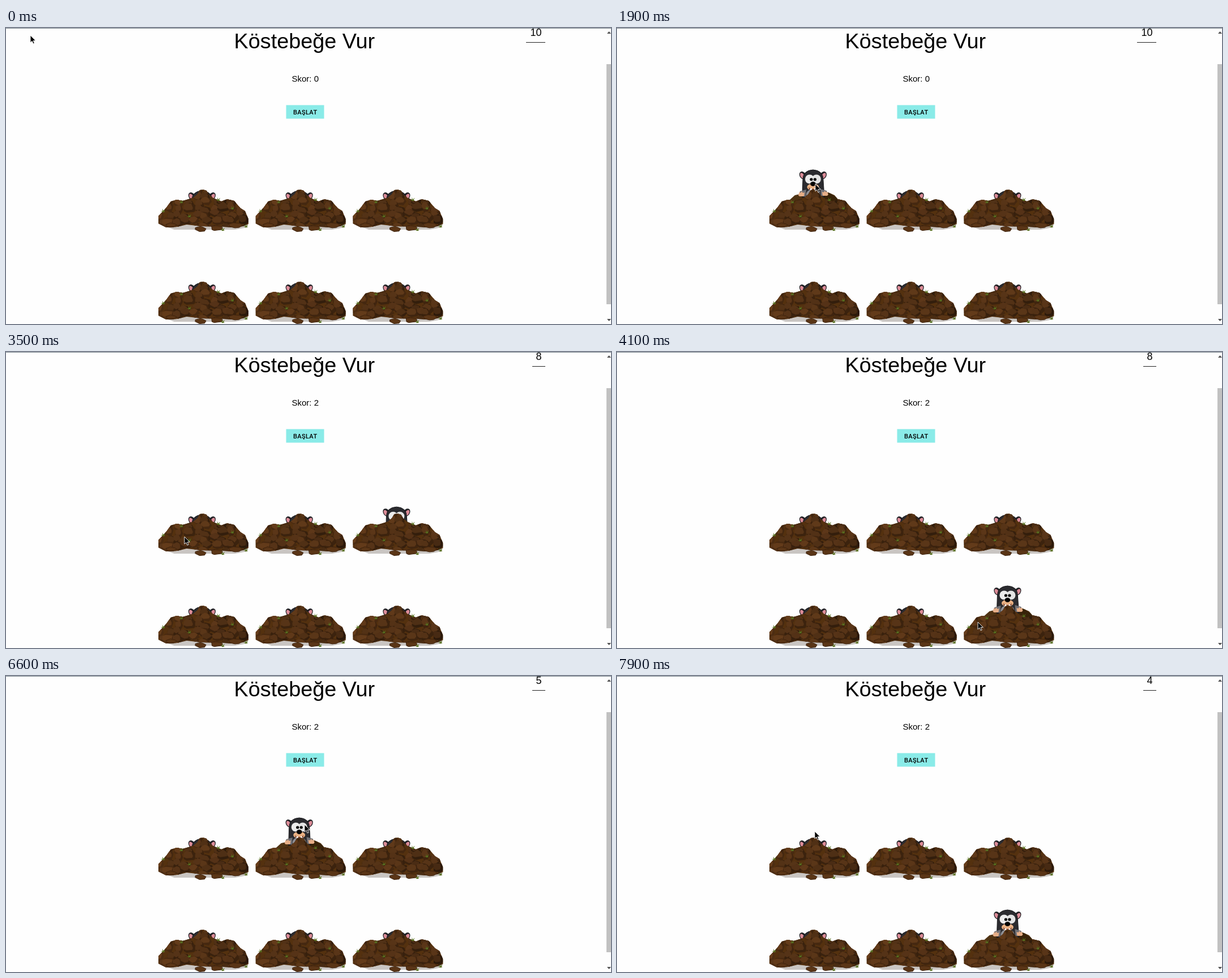
An HTML page that plays this animation: 1068 by 524 pixels, repeating every 8000 ms.

```html
<!DOCTYPE html>
<html lang="tr">
<head>
<meta charset="utf-8">
<title>Köstebeğe Vur</title>
<style>
  html, body { margin: 0; width: 100%; height: 100%; overflow: hidden; background: #fefefe; }
  svg { display: block; width: 1068px; height: 524px; }
  text { font-family: "Liberation Sans", Arial, sans-serif; fill: #000; }
  #label { font: 500 11px Roboto, sans-serif; letter-spacing: .35px; }
</style>
</head>
<body>
<svg viewBox="0 0 1068 524">
  <defs>
    <path id="outline" d="M0 83L14 68 22 57 32 54 43 56 53 53 62 50 69 44 73 37 79 36 85 38 89 45 97 51 111 57 121 53 134 56 145 69 153 74 159 88V97L149 101 136 103 115 102 76 101 50 98 33 102 14 103 0 96Z"/>
    <clipPath id="edge"><use href="#outline"/></clipPath>
    <clipPath id="ground"><rect x="-10" y="-10" width="180" height="104"/></clipPath>
    <path id="leaf" d="M0 4L-5 1 -1 2 -1 -4 1 1 5 -3 3 2 5 3Z" fill="#587020"/>
    <g id="mole">
      <path d="M35 55L45 46 62 42 104 41 115 46 126 59 108 92H48Z" fill="#4f3313"/>
      <path d="M92 46L106 42 118 50 124 60 104 56Z" fill="#382309"/>
      <g id="side">
        <g transform="rotate(-32 59 11)">
          <ellipse cx="59" cy="11" rx="5.500" ry="7.500" fill="#202024"/>
          <ellipse cx="58" cy="11" rx="3.200" ry="5.500" fill="#dc8c98"/>
        </g>
      </g>
      <use href="#side" transform="matrix(-1 0 0 1 154 0)"/>
      <path d="M58 50L59 19Q59 2 77 1 95 2 95 19L97 50Z" fill="#2b2b2f" stroke="#161619"/>
      <ellipse cx="77" cy="45" rx="12" ry="10" fill="#8f8f94"/>
      <circle cx="71" cy="17.500" r="8" fill="#ececec"/>
      <circle cx="83" cy="17.500" r="8" fill="#e4e4e4"/>
      <circle cx="74" cy="18" r="2.600"/>
      <circle cx="80.500" cy="18" r="2.600"/>
      <ellipse cx="77" cy="31.500" rx="10.500" ry="6" fill="#eab183"/>
      <path d="M69 32Q77 38 85 32L83 36H71Z" fill="#6b3328"/>
      <path d="M72 34H75V38H72ZM79 34H82V38H79Z" fill="#fff"/>
      <ellipse cx="77" cy="26" rx="4.800" ry="4"/>
      <g id="paw">
        <path d="M65 36L54 39 53 45 64 49Z" fill="#707075"/>
        <path d="M53 48L51 46 53 40 55 42 57 39 59 42 62 41 61 48Z" fill="#e6ae87"/>
      </g>
      <use href="#paw" transform="matrix(-1 0 0 1 155 -1)"/>
    </g>
    <g id="hill">
      <path d="M12 101L40 97H120L158 96 157 103 135 107H28Z" fill="#c9c5c2"/>
      <use href="#outline" fill="#54310f"/>
      <g id="rocks" clip-path="url(#edge)"></g>
      <g id="pebbles" fill="#5a3516" stroke="#3d220d"></g>
      <g id="leaves"></g>
    </g>
  </defs>
  <rect width="1068" height="1" fill="#7b868e"/>
  <text x="402.500" y="36" font-size="37.800">Köstebeğe Vur</text>
  <text id="score" x="504.500" y="95" font-size="15"></text>
  <rect id="button" x="494.500" y="136.500" width="67" height="24"/>
  <text id="label" x="507" y="152.500">BAŞLAT</text>
  <text id="clock" x="945.500" y="14" font-size="18" text-anchor="end"></text>
  <rect id="rule" y="25" height="1" fill="#222"/>
  <rect x="1060" y="64" width="8" height="425" fill="#c1c1c1"/>
  <path d="M1061 10L1064.500 6 1068 10ZM1061 515L1064.500 519 1068 515Z" fill="#505050"/>
  <g id="holes"></g>
  <path id="cursor" d="M0 0V13L3 10.200 5.100 15 7.200 14.100 5.200 9.400H9.300Z" stroke="#fff" stroke-width=".9"/>
</svg>
<script>
const LOOP = 8000, STEP = 100;
const FIRST = 1200, EVERY = 1240, STAY = 930, TRAVEL = 400, DROP = 37;
const order = [0, 2, 5, 4, 1, 5];
const hits = [2100, 3000];

// arrival time, x, y
const stops = [
  [0, 43, 13], [200, 424, 167], [500, 581, 168], [1000, 530, 148],
  [1300, 598, 9], [1900, 350, 276], [2700, 560, 331], [2900, 690, 276],
  [3200, 423, 319], [3600, 279, 330], [4100, 637, 478], [4300, 652, 443],
  [4800, 324, 400], [5200, 538, 448], [5600, 523, 442], [6000, 279, 350],
  [6600, 527, 263], [6800, 500, 18], [7000, 304, 190], [7900, 349, 275]
];

const $ = id => document.getElementById(id);
const add = (id, markup) => $(id).insertAdjacentHTML("beforeend", markup);
const clamp = p => Math.min(1, Math.max(0, p));
const ease = p => 1 - Math.pow(1 - clamp(p), 2.5);

let seed = 11;
function random(min, max) {
  seed = seed * 16807 % 2147483647;
  return min + (max - min) * seed / 2147483647;
}

function rock(x, y, rx, ry) {
  const points = [];
  for (let i = 0; i < 7; i++) {
    const a = i * Math.PI * 2 / 7 + random(-.3, .3), r = random(.8, 1.1);
    points.push((x + rx * r * Math.cos(a)).toFixed(1) + "," + (y + ry * r * Math.sin(a)).toFixed(1));
  }
  return points.join(" ");
}

// Overlapping boulders, each lit from the upper left and darker to the right.
function buildHill() {
  for (let y = 38; y < 106; y += 11) {
    for (let x = 4; x < 162; x += 16) {
      const cx = x + random(-6, 6), cy = y + random(-4, 4);
      const rx = random(8, 13), ry = random(7, 11);
      const light = random(21, 26) - x / 40;
      add("rocks", `<polygon points="${rock(cx, cy, rx, ry)}" fill="hsl(27 62% ${light - 7}%)"/>` +
        `<polygon points="${rock(cx - 2, cy - 2, rx * .8, ry * .75)}" fill="hsl(27 58% ${light}%)"/>`);
    }
  }
  for (const [x, y, r] of [[22, 99, 10], [74, 106, 11], [104, 104, 12], [137, 99, 13]])
    add("pebbles", `<polygon points="${rock(x, y, r, r * .4)}"/>`);
  for (const [x, y] of [[8, 73], [40, 57], [105, 53], [130, 68], [54, 82], [113, 106], [154, 100]])
    add("leaves", `<use href="#leaf" transform="translate(${x} ${y}) scale(.8)"/>`);
}

function buildHoles() {
  for (let i = 0; i < 6; i++) {
    const x = 269 + i % 3 * 171.700, y = 250 + Math.floor(i / 3) * 163;
    add("holes", `<g transform="translate(${x} ${y})"><g clip-path="url(#ground)">` +
      `<use class="mole" href="#mole"/></g><use href="#hill"/></g>`);
  }
  return [...document.querySelectorAll(".mole")];
}

function lift(hole, t) {
  return order.reduce((sum, h, i) => {
    const age = t - FIRST - EVERY * i;
    return h === hole ? sum + ease(age / TRAVEL) - ease((age - STAY) / TRAVEL) : sum;
  }, 0);
}

function pointer(t) {
  const i = stops.findIndex(s => s[0] >= t);
  if (i < 1) return stops[0].slice(1);
  const [t0, x0, y0] = stops[i - 1], [t1, x1, y1] = stops[i];
  const p = (t - t0) / (t1 - t0);
  return [x0 + (x1 - x0) * p, y0 + (y1 - y0) * p];
}

function draw(t) {
  moles.forEach((mole, i) =>
    mole.setAttribute("transform", `translate(0 ${(DROP * (1 - lift(i, t))).toFixed(2)})`));
  const [x, y] = pointer(t).map(Math.round);
  $("cursor").setAttribute("transform", `translate(${x} ${y})`);
  const over = x >= 495 && x < 562 && y >= 136 && y < 161;
  $("button").setAttribute("fill", over ? "#7ee0dc" : "#8aebe8");
  const left = 10 - Math.max(0, Math.floor((t - 1070) / 1035));
  const width = left > 9 ? 34 : 23;
  $("clock").textContent = left;
  $("rule").setAttribute("x", 952 - width);
  $("rule").setAttribute("width", width);
  $("score").textContent = "Skor: " + hits.filter(h => h <= t).length;
}

buildHill();
const moles = buildHoles();
const start = performance.now();
function tick() {
  const t = (performance.now() - start) % LOOP;
  draw(Math.floor(t / STEP) * STEP);
  requestAnimationFrame(tick);
}
tick();
</script>
</body>
</html>
```
